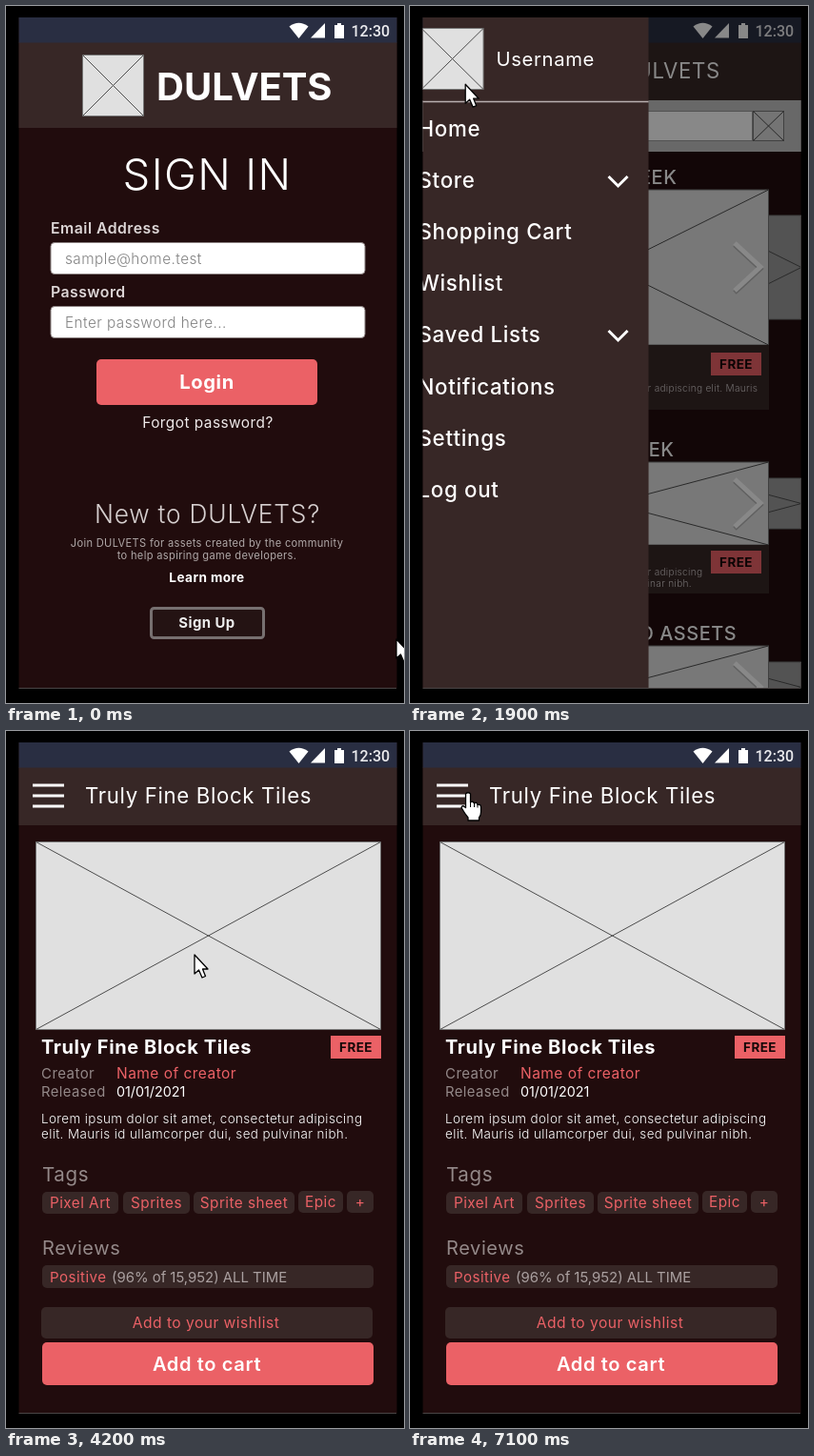
These frames come from a looping animation (418 by 732 pixels, 7.2 s). An HTML page:

```html
<!DOCTYPE html>
<html lang="en">
<head>
<meta charset="utf-8">
<title>Asset store prototype</title>
<style>
  html, body { margin: 0; width: 100%; height: 100%; overflow: hidden; background: #000; }
  svg { display: block; width: 418px; height: 732px; }
  text { font-family: Inter, "Open Sans", sans-serif; letter-spacing: .03em; white-space: pre; }
  .tight { letter-spacing: 0; }
  .clock { font-family: Roboto, sans-serif; letter-spacing: 0; }
</style>
</head>
<body>
<svg id="stage" viewBox="0 0 418 732"></svg>
<script>
const LOOP = 7200, STEP = 100;
const BG = '#210c0d', PANEL = '#372726', RED = '#eb6166', IMG = '#e0e0e0', LINE = '#4c4c4c';
const BRAND = 'DULVETS', PACK = 'Truly Fine Block Tiles';
const stage = document.getElementById('stage');

function el(parent, tag, attrs = {}) {
  const node = document.createElementNS('http://www.w3.org/2000/svg', tag);
  for (const key in attrs) node.setAttribute(key, attrs[key]);
  return parent.appendChild(node);
}
const group = (parent, attrs) => el(parent, 'g', attrs);
const box = (g, x, y, width, height, fill, extra) =>
  el(g, 'rect', { x, y, width, height, fill, ...extra });
const path = (g, d, extra) => el(g, 'path', { d, fill: 'none', ...extra });

function text(g, x, y, str, size, weight = 400, fill = '#fff', extra = {}) {
  const node = el(g, 'text', { x, y, 'font-size': size, 'font-weight': weight, fill, ...extra });
  node.textContent = str;
  return node;
}
const mid = { 'text-anchor': 'middle' }, end = { 'text-anchor': 'end' }, tight = { class: 'tight' };

// Placeholder picture: a box with both diagonals
function picture(g, x, y, w, h, fill = IMG) {
  box(g, x, y, w, h, fill, { stroke: '#777', 'stroke-width': 1 });
  path(g, `M${x} ${y}l${w} ${h}M${x} ${y + h}l${w} ${-h}`, { stroke: LINE, 'stroke-width': 1 });
}
function badge(g, x, y, w = 53) {
  box(g, x, y, w, 24, RED);
  text(g, x + w / 2, y + 17, 'FREE', 13.5, 700, '#160808', mid);
}
function header(g, title) {
  box(g, 13, 38, 398, 61, PANEL);
  path(g, 'M28 57h33M28 68h33M28 79h33', { stroke: '#fff', 'stroke-width': 3 });
  text(g, 83, 75.5, title, 22.2, 400);
}
function searchBar(g) {
  box(g, 13, 99, 398, 54, '#c3c3c3');
  box(g, 30.5, 110.5, 329, 31, '#fff', { stroke: '#999' });
  text(g, 45, 131, 'Search for game assets...', 13.2, 300, '#777');
  picture(g, 360.5, 110.5, 32, 31, '#d8d8d8');
}
function page() {
  const g = group(phone);
  box(g, 13, 12, 398, 705, BG);
  return g;
}

const defs = el(stage, 'defs');
box(el(defs, 'clipPath', { id: 'screen' }), 13.5, 12, 397, 704.5);
box(stage, 0, 0, 418, 732, '#000');
const phone = group(stage, { 'clip-path': 'url(#screen)' });

function makeLogin() {
  const g = page();
  box(g, 13, 38, 398, 90, PANEL);
  picture(g, 80.5, 51.5, 64, 64);
  text(g, 158, 99, BRAND, 40, 700, '#fff', tight);
  text(g, 211.5, 193, 'SIGN IN', 45.5, 300, '#fff', mid);
  const field = (y, label, hint) => {
    text(g, 47, y - 10, label, 15.8, 600, '#ddd6d6');
    box(g, 47, y, 330, 33, '#fff', { rx: 4, stroke: '#8c8282' });
    text(g, 62, y + 22, hint, 15.3, 300, '#828282');
  };
  field(248.5, 'Email Address', 'sample@home.test');
  field(315.5, 'Password', 'Enter password here...');
  box(g, 95, 371, 232, 48, RED, { rx: 5 });
  text(g, 211, 402, 'Login', 20.2, 700, '#fff', mid);
  text(g, 212, 443, 'Forgot password?', 15.4, 400, '#efeaea', mid);
  text(g, 211.5, 543, `New to ${BRAND}?`, 26.3, 300, '#d6cfcf', mid);
  text(g, 211, 568, `Join ${BRAND} for assets created by the community`, 11.1, 400, '#b0a8a8', mid);
  text(g, 211, 581, 'to help aspiring game developers.', 11.1, 400, '#b0a8a8', mid);
  text(g, 211, 605, 'Learn more', 13.6, 700, '#fff', mid);
  box(g, 152.5, 632.5, 118, 31, '#241313', { rx: 3, stroke: '#777070', 'stroke-width': 3 });
  text(g, 211, 653, 'Sign Up', 14.9, 700, '#eee', mid);
  return g;
}

function makeHome() {
  const g = page();
  header(g, 'Welcome to ' + BRAND);
  searchBar(g);
  const carousel = (title, y, h, side, cy) => {
    const w = 328 * side / h;
    text(g, 49, y - 6, title, 19.9, 500);
    picture(g, 411 - w / 2, y + (h - side) / 2, w, side, '#9c9c9c');
    picture(g, 48, y, 328.5, h);
    path(g, `M82 ${cy - 25}l-26 25l26 25`, { stroke: '#9b9b9b', 'stroke-width': 5 });
    path(g, `M341 ${cy - 23}l27 25l-27 25`, { stroke: '#b5b5b5', 'stroke-width': 5 });
    path(g, `M341 ${cy - 25}l27 25l-27 25`, { stroke: '#fff', 'stroke-width': 5 });
  };
  const small = (y, str) => text(g, 53, y, str, 10.1, 300, '#d0c9c9');
  carousel('BUNDLE OF THE WEEK', 193, 163, 109, 274);
  box(g, 48, 356, 329, 68, PANEL);
  text(g, 53, 373, 'Name Of Bundle', 15.8, 400);
  text(g, 53, 390, 'Name Of Creator', 13.4, 300, '#d0c9c9');
  small(405, 'Lorem ipsum dolor sit amet, consectetur adipiscing elit. Mauris');
  small(417, 'id ullamcorper dui, sed pulvinar nibh.');
  badge(g, 316, 364);

  carousel('ASSETS OF THE WEEK', 479, 87, 53, 522);
  box(g, 48, 566, 329, 51, PANEL);
  text(g, 53, 582, 'Name Of Asset', 15.8, 400);
  small(598, 'Lorem ipsum dolor sit amet, consectetur adipiscing');
  small(610, 'elit. Mauris id ullamcorper dui, sed pulvinar nibh.');
  badge(g, 316, 572);

  carousel('COMMUNITY RATED ASSETS', 672, 87, 53, 715);
  return g;
}

function makeStore() {
  const g = page();
  header(g, 'Store - All Game Assets');
  searchBar(g);
  [169, 336, 503.5, 672].forEach((y, i) => {
    const x = i < 2 ? 30.5 : 29.5;
    box(g, x, y, 361, 157, PANEL);
    picture(g, x, y + 19, 360, 87);
    text(g, x + 6.5, y + 15.5, i ? 'Name Of Asset' : PACK, 15.8, 400);
    text(g, x + 356, y + 13, 'Add to wish list', 11.8, 300, '#9b9090', end);
    text(g, x + 6, y + 122, i ? 'Name of Creator' : 'Lorn Dax', 15.8, 400);
    text(g, x + 6, y + 138, 'Lorem ipsum dolor sit amet, consectetur adipiscing elit.', 10.1, 300, '#d6cfcf');
    text(g, x + 6, y + 150, 'Mauris id ullamcorper dui, sed pulvinar nibh.', 10.1, 300, '#d6cfcf');
    badge(g, x + 298, y + 112);
  });
  return g;
}

function makeItem() {
  const g = page(), grey = '#948989';
  header(g, PACK);
  picture(g, 31.5, 116.5, 362, 197);
  text(g, 37, 339, PACK, 20, 700);
  badge(g, 341, 320);
  text(g, 37, 365, 'Creator', 15, 400, grey);
  text(g, 116, 365, 'Name of creator', 15.5, 400, RED);
  text(g, 37, 384, 'Released', 14.8, 400, grey);
  text(g, 116, 384, '01/01/2021', 14.3, 400, '#fff', tight);
  text(g, 37, 412, 'Lorem ipsum dolor sit amet, consectetur adipiscing', 13.4, 300);
  text(g, 37, 428, 'elit. Mauris id ullamcorper dui, sed pulvinar nibh.', 13.4, 300);
  text(g, 38, 473, 'Tags', 20.5, 400, grey);
  const tags = [
    [38, 484, 80, 'Pixel Art'], [123, 484, 70, 'Sprites'], [197, 484, 106, 'Sprite sheet'],
    [307, 483, 47, 'Epic'], [358, 483, 28, '+']
  ];
  for (const [x, y, w, label] of tags) {
    box(g, x, y, w, 23, PANEL, { rx: 5 });
    text(g, x + w / 2, y + 16.5, label, 15.3, 400, RED, mid);
  }
  text(g, 38, 550, 'Reviews', 20, 400, grey);
  box(g, 38, 561, 348, 24, PANEL, { rx: 5 });
  text(g, 46, 579, 'Positive', 15.1, 400, RED);
  text(g, 111, 579, '(96% of 15,952) ALL TIME', 14.9, 400, '#aaa0a0', tight);
  box(g, 37, 605, 348, 33, PANEL, { rx: 5 });
  text(g, 210, 627, 'Add to your wishlist', 15.6, 400, RED, mid);
  box(g, 38, 642, 348, 45, RED, { rx: 5 });
  text(g, 211, 672, 'Add to cart', 20.1, 600, '#fff', mid);
  return g;
}

function makeStatus() {
  const g = group(phone), ink = { fill: '#fff' };
  box(g, 13, 12, 398, 26.5, '#292e42');
  path(g, 'M307.500 34L297.500 21.500Q307.500 14 317.500 21.500Z', ink);
  path(g, 'M335 18V33.500H320Z', ink);
  path(g, 'M345 20h3v-2h4v2h3v14h-10z', ink);
  text(g, 362.5, 32, '12:30', 16, 500, '#e9e9ec', { class: 'clock' });
}

function makeDrawer() {
  const g = group(phone), mark = { stroke: '#fff', 'stroke-width': 3 };
  box(g, 13, 12, 255, 705, PANEL);
  picture(g, 29.5, 23.5, 65, 64);
  text(g, 108, 63, 'Username', 20.3, 400);
  path(g, 'M13 100.500H268', { stroke: '#b9b0b0', 'stroke-width': 1.5 });
  const row = (parent, y, label) => text(parent, 26, y, label, 22.3, 500);
  row(g, 137, 'Home');
  row(g, 191, 'Store');
  path(g, 'M226 179l10 10l10-10', mark);
  const sub = text(g, 40, 243, 'All Game Assets', 18, 400);
  const rest = group(g);
  ['Shopping Cart', 'Wishlist', 'Saved Lists', 'Notifications', 'Settings', 'Log out']
    .forEach((label, i) => row(rest, 245 + i * 54.2, label));
  path(rest, 'M226 341l10 10l10-10', mark);
  return { g, sub, rest };
}

function makeToast() {
  const g = group(phone);
  box(g, 22, 665, 379, 60, '#343434', { rx: 5 });
  text(g, 40, 698, 'Added to your wishlist.', 17.1, 400);
  text(g, 387, 697, 'UNDO', 18, 400, RED, end);
  return g;
}

const login = makeLogin(), home = makeHome(), store = makeStore(), item = makeItem();
const pages = [login, home, store, item];
makeStatus();
const shade = box(phone, 13, 12, 398, 705, '#000');
const drawer = makeDrawer();
const toast = makeToast();
path(stage, 'M13.500 716.500H410', { stroke: '#4a4545', 'stroke-width': 1 });

const cursor = group(stage, { fill: '#fff', stroke: '#000', 'stroke-width': 1.3, 'stroke-linejoin': 'round' });
const arrow = el(cursor, 'path', { d: 'M0 0V20L4.500 16L8 24L11.500 22.500L8.500 15H14Z' });
const hand = group(cursor);
el(hand, 'path', { d: 'M-2.500 1Q0-1.500 2.500 1V10Q5 8 6.500 11Q9 9 10 12.500Q13.500 11.500 13.500 15V20Q13.500 24 11.500 26V29H0V26Q-4 21-7 15.500Q-6 12-2.500 15.500Z' });
path(hand, 'M2.500 10v5M6.500 11v4M10 12.500v3', { 'stroke-width': 1 });

// Pointer stops: time, x, y
const stops = [
  [0, 410, 665], [500, 224, 400], [800, 220, 396], [1500, 54, 76], [1700, 53, 77],
  [2000, 60, 84], [2500, 236, 188], [2800, 236, 188], [3200, 183, 232], [3700, 183, 232],
  [4200, 198, 235], [5000, 360, 646], [5300, 205, 617], [5500, 205, 617],
  [5800, 211, 558], [6200, 205, 552], [6500, 110, 150], [6600, 110, 150], [7000, 61, 65], [7200, 61, 65]
];
// Spans in which the pointer is a hand
const handSpans = [[400, 800], [1400, 1600], [2200, 3900], [5200, 5600], [6900, 7200]];

const clamp = v => Math.max(0, Math.min(1, v));
const easeOut = v => 1 - (1 - v) ** 2;
const smooth = v => v * v * (3 - 2 * v);
const ramp = (t, from, length) => easeOut(clamp((t - from) / length));
const move = (node, x, y) => node.setAttribute('transform', `translate(${x} ${y})`);
const fade = (node, v) => {
  node.setAttribute('opacity', v);
  node.style.display = v > 0 ? '' : 'none';
};

function pointerAt(t) {
  const i = stops.findIndex(s => s[0] > t);
  const [t0, x0, y0] = stops[i - 1], [t1, x1, y1] = stops[i];
  const k = smooth((t - t0) / (t1 - t0));
  return [x0 + (x1 - x0) * k, y0 + (y1 - y0) * k];
}

function draw(t) {
  // Each page covers the one before; a fully covered page is hidden
  const levels = [1, ramp(t, 650, 300), t >= 3500 ? 1 : 0, ramp(t, 3750, 300)];
  pages.forEach((p, i) => fade(p, levels[i + 1] === 1 ? 0 : levels[i]));

  const open = t < 3500 ? ramp(t, 1678.5, 300) : 0;
  fade(shade, open * .5);
  move(drawer.g, -255 * (1 - open), 0);
  fade(drawer.g, open);
  drawer.g.setAttribute('opacity', 1);
  const unfold = ramp(t, 2700, 300);
  fade(drawer.sub, unfold);
  move(drawer.rest, 0, 54 * unfold);

  const shown = ramp(t, 5450, 250) - ramp(t, 6650, 300);
  move(toast, 0, 56 * (1 - shown));

  move(cursor, ...pointerAt(t));
  const pointing = handSpans.some(([a, b]) => t >= a && t < b);
  fade(hand, pointing ? 1 : 0);
  fade(arrow, pointing ? 0 : 1);
}

const start = performance.now();
function tick() {
  // Ten poses a second; the small lead absorbs timer jitter
  const t = Math.floor((performance.now() - start + 15) / STEP) * STEP % LOOP;
  draw(t);
  requestAnimationFrame(tick);
}
tick();
</script>
</body>
</html>
```
